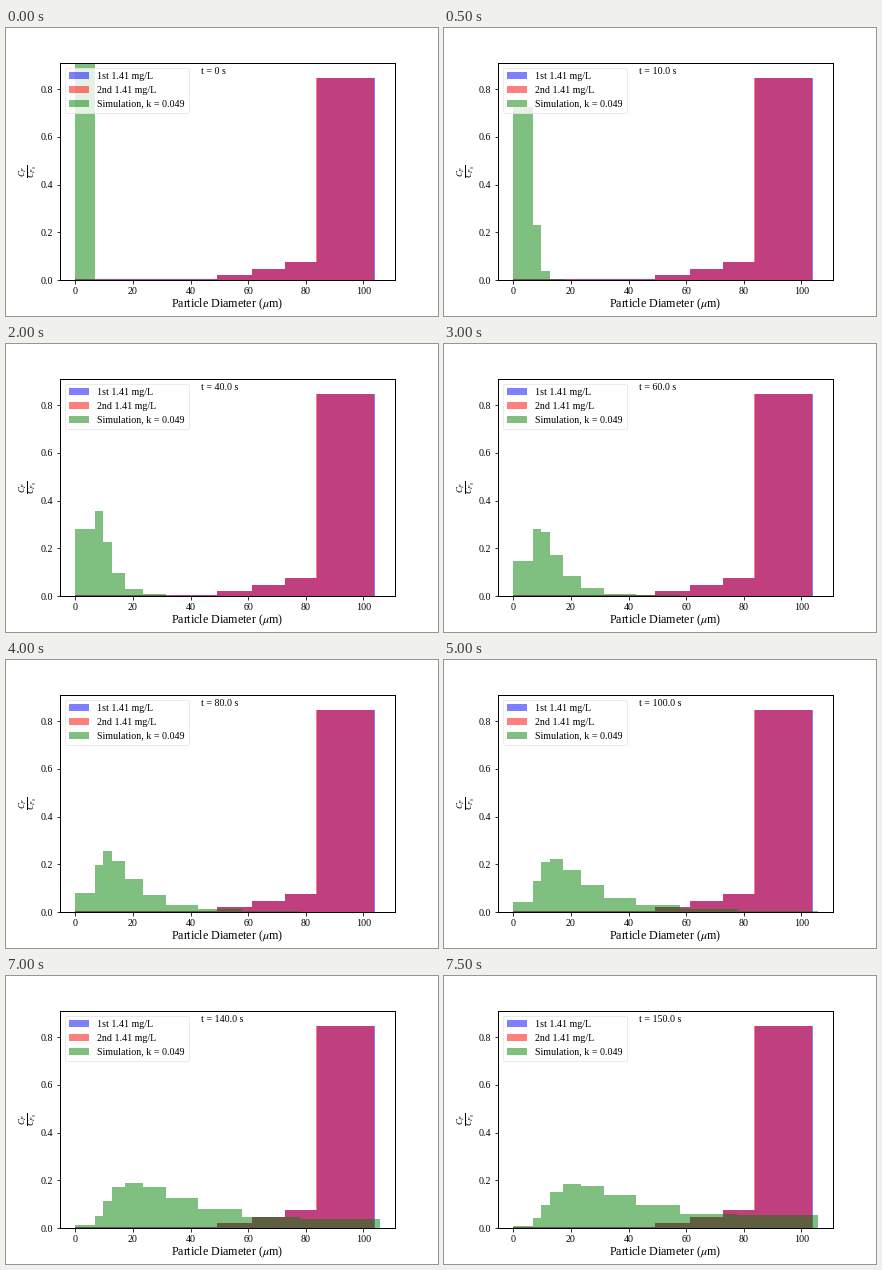
These frames come from a looping animation (432 px wide and 288 px high, 8000 ms). A matplotlib script:

```python
import math

import matplotlib.pyplot as plt
import numpy as np
from matplotlib.animation import FuncAnimation

plt.rcParams.update({
    "font.family": "Liberation Serif",
    "mathtext.fontset": "stix",
    "font.size": 10,
    "text.kerning_factor": 6,
    "axes.linewidth": 1,
    "axes.labelpad": 1,
    "axes.labelsize": 12,
    "legend.edgecolor": "0.9",
})

FRAMES = 16
STEP = 10.0      # simulated seconds per frame
RATE = 0.03188   # transfer rate from one size class to the next
BINS = 10
D_MAX = 105.6
GROWTH = 1.3517  # ratio of neighbouring class limits

limits = np.append(0, D_MAX / GROWTH ** np.arange(BINS - 1, -1, -1))
measured = [0.003, 0.021, 0.046, 0.075, 0.847]
first_edges = [0, 49.2, 61.4, 72.8, 83.9, 103.9]
second_edges = [0, 49.2, 61.4, 72.8, 83.5, 103.5]


def fractions(t):
    """Chain of equal-rate steps; the last class collects the rest."""
    a = RATE * t
    p = [math.exp(-a) * a ** n / math.factorial(n) for n in range(BINS - 1)]
    return p + [max(0.0, 1 - sum(p))]


def hist(ax, edges, heights, color, label):
    return ax.bar(edges[:-1], heights, np.diff(edges), align="edge",
                  color=color, alpha=0.5, label=label)


fig, ax = plt.subplots(figsize=(6, 4), dpi=72)
fig.subplots_adjust(left=0.125, right=0.9, bottom=0.125, top=0.88)

hist(ax, first_edges, measured, "b", "1st 1.41 mg/L")
hist(ax, second_edges, measured, "r", "2nd 1.41 mg/L")
bars = hist(ax, limits, fractions(0), "g", "Simulation, k = 0.049")

ax.set_xlim(-0.05 * D_MAX, 1.05 * D_MAX)
ax.set_ylim(0, 0.9117)
ax.set_xticks(range(0, 101, 20))
ax.set_yticks(np.arange(5) * 0.2)
ax.set_xlabel(r"Particle Diameter ($\mu$m)")
ax.set_ylabel(r"$\frac{C_P}{C_{P_0}}$")
ax.legend(loc="upper left")
clock = ax.text(0.42, 0.946, "", transform=ax.transAxes)


def update(i):
    t = i * STEP
    for bar, h in zip(bars, fractions(t)):
        bar.set_height(h)
    clock.set_text(f"t = {t:.1f} s" if i else "t = 0 s")
    return [*bars, clock]


anim = FuncAnimation(fig, update, frames=FRAMES, interval=500,
                     repeat=True, repeat_delay=0)
plt.show()
```
